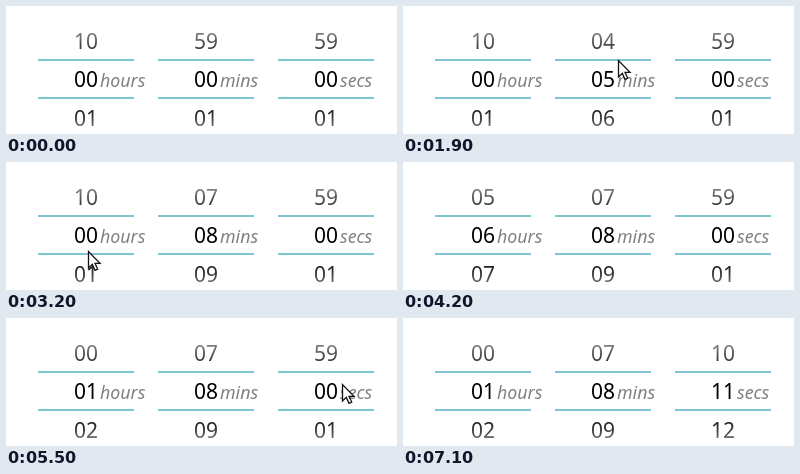
An HTML page with a canvas that plays this animation: 391x128 px, repeating every 8600 ms.

```html
<!DOCTYPE html>
<html lang="en">
<head>
<meta charset="utf-8">
<title>Time picker</title>
<style>
  html, body { margin: 0; width: 100%; height: 100%; overflow: hidden; background: #fff; }
  canvas { display: block; }
</style>
</head>
<body>
<canvas id="stage" width="391" height="128"></canvas>
<script>
const ctx = document.getElementById('stage').getContext('2d');
const LOOP = 8600, STEP = 100;
const ROW = 38.4, BASELINE = 81.2, WIDTH = 96, GAP = 120, LINE = 2;
const TOP = 17, UPPER = 53, LOWER = 91, BOTTOM = 129;

const lerp = (a, b, p) => a + (b - a) * p;
const progress = (t, start, end) => Math.min(1, Math.max(0, (t - start) / (end - start)));
const flick = p => 1 - (1 - p) ** 1.93;
const drag = p => p < .5 ? 4 * p ** 3 : 1 - 4 * (1 - p) ** 3;

// A spin turns the wheel to a new value between two times
const wheels = [
  { label: 'hours', count: 11, spins: [
    { start: 3300, end: 4000, to: 6 }, { start: 4300, end: 5100, to: 12 }] },
  { label: 'mins', count: 60, spins: [
    { start: 1300, end: 1900, to: 5 }, { start: 2400, end: 2900, to: 8, ease: drag }] },
  { label: 'secs', count: 60, spins: [
    { start: 5500, end: 6200, to: 6 }, { start: 6300, end: 7100, to: 11 }] },
];

// On each visit the pointer travels to a wheel, presses and swipes upwards
const visits = [
  { enter: 700, leave: 4000, swipes: [
    { arrive: 1200, press: 1300, release: 1500, x: 218, y: 62, lean: 9 },
    { arrive: 2400, press: 2400, release: 2900, x: 199, y: 88, lean: 1 },
    { arrive: 3200, press: 3300, release: 3600, x: 82, y: 89, lean: 13 }] },
  { enter: 5300, leave: 6200, swipes: [
    { arrive: 5500, press: 5500, release: 5900, x: 336, y: 66, lean: 0 }] },
];
const SWIPE_TOP = 27;
const arrow = new Path2D('M.5.5V17L4.3 13.4L7 19.3L9.7 18.1L7 12.3H12z');

// White veil that thickens from the middle band outwards
function veil(from, to, strength, power) {
  const gradient = ctx.createLinearGradient(0, from, 0, to);
  for (let p = 0; p <= 1; p += .125) {
    gradient.addColorStop(p, `rgba(255,255,255,${.1 + strength * p ** power})`);
  }
  return gradient;
}
const upperVeil = veil(UPPER, TOP, .62, 1.3);
const lowerVeil = veil(LOWER, BOTTOM, .75, 3);

function wheelValue(spins, t) {
  return spins.reduce((value, { start, end, to, ease = flick }) =>
    lerp(value, to, ease(progress(t, start, end))), 0);
}

function drawWheel({ label, count, spins }, x, t) {
  const value = wheelValue(spins, t), base = Math.floor(value);
  ctx.save();
  ctx.beginPath();
  ctx.rect(x, TOP, WIDTH, BOTTOM - TOP);
  ctx.clip();
  ctx.fillStyle = '#000';
  ctx.font = '21px "Noto Sans", sans-serif';
  for (let n = base - 2; n <= base + 3; n++) {
    const text = String((n + count) % count).padStart(2, '0');
    ctx.fillText(text, x + 36, Math.round(BASELINE + (n - value) * ROW));
  }
  ctx.fillStyle = upperVeil;
  ctx.fillRect(x, TOP, WIDTH, UPPER - TOP);
  ctx.fillStyle = lowerVeil;
  ctx.fillRect(x, LOWER, WIDTH, BOTTOM - LOWER);
  ctx.restore();

  ctx.fillStyle = '#80c6d2';
  ctx.fillRect(x, UPPER, WIDTH, LINE);
  ctx.fillRect(x, LOWER, WIDTH, LINE);
  ctx.fillStyle = '#808080';
  ctx.font = 'italic 17.8px "Noto Sans", sans-serif';
  ctx.fillText(label, x + 62, 81);
}

function pointerAt({ enter, swipes }, t) {
  let x = swipes[0].x - 13, y = BOTTOM, since = enter;
  for (const swipe of swipes) {
    const travel = progress(t, since, swipe.arrive);
    const rise = drag(progress(t, swipe.press, swipe.release));
    x = lerp(x, swipe.x, travel) + swipe.lean * rise;
    y = lerp(lerp(y, swipe.y, travel), SWIPE_TOP, rise);
    since = swipe.release;
  }
  return [Math.round(x), Math.round(y)];
}

function drawPointer(t) {
  const visit = visits.find(v => t > v.enter && t < v.leave);
  if (!visit) return;
  ctx.save();
  ctx.translate(...pointerAt(visit, t));
  ctx.fillStyle = '#fff';
  ctx.strokeStyle = '#111';
  ctx.lineWidth = 1.3;
  ctx.fill(arrow);
  ctx.stroke(arrow);
  ctx.restore();
}

function draw(now) {
  const t = Math.floor(now % LOOP / STEP) * STEP;
  ctx.fillStyle = '#fff';
  ctx.fillRect(0, 0, 391, 128);
  wheels.forEach((wheel, i) => drawWheel(wheel, 32 + GAP * i, t));
  drawPointer(t);
}

let began;
function tick(now) {
  began ??= now;
  draw(now - began);
  requestAnimationFrame(tick);
}
draw(0);
requestAnimationFrame(tick);
</script>
</body>
</html>
```
